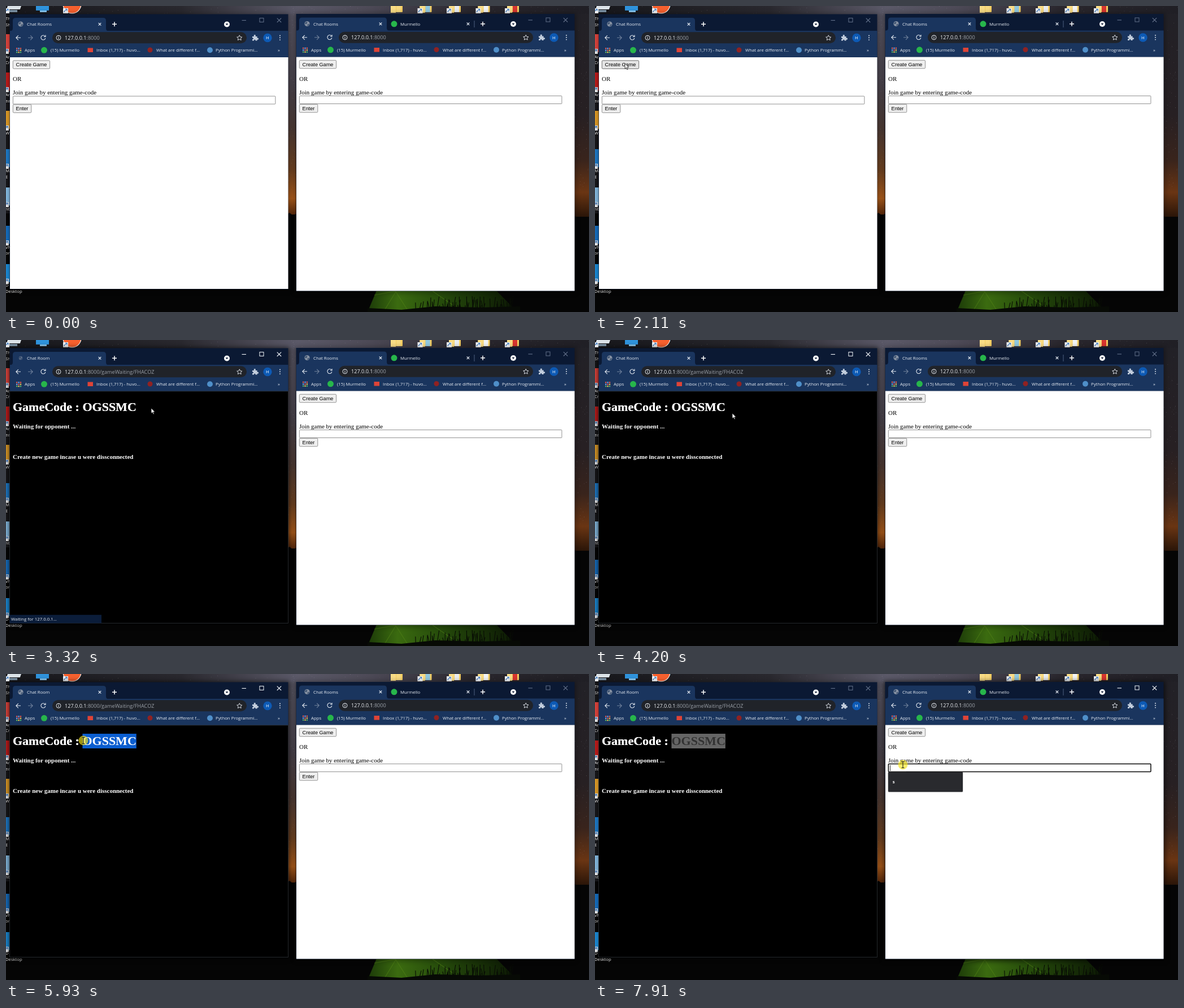
An HTML page that plays this animation: 1032 px wide and 543 px high, repeating every 8 s.

```html
<!DOCTYPE html>
<html lang="en">
<head>
<meta charset="utf-8">
<title>Chat Rooms</title>
<style>
html, body { margin: 0; width: 100%; height: 100%; overflow: hidden; background: #050505; }
svg { display: block; width: 100%; height: 100%; }
text { white-space: pre; }
.ui { font-family: "Open Sans", "Noto Sans", sans-serif; }
.page { font-family: "Liberation Serif", serif; }
.form { font-family: "Liberation Sans", sans-serif; }
.bold { font-weight: 700; }
.line { fill: none; stroke-width: 1.1; }
</style>
</head>
<body>
<svg id="stage" viewBox="0 0 1032 543"></svg>
<script>
const LOOP = 8000;
const stage = document.getElementById('stage');

const text = (x, y, s, size, fill, cls = 'ui', attrs = '') =>
  `<text x="${x}" y="${y}" font-size="${size}" fill="${fill}" class="${cls}" ${attrs}>${s}</text>`;
const rect = (x, y, w, h, fill, attrs = '') =>
  `<rect x="${x}" y="${y}" width="${w}" height="${h}" fill="${fill}" ${attrs}/>`;
const circle = (x, y, r, fill, attrs = '') =>
  `<circle cx="${x}" cy="${y}" r="${r}" fill="${fill}" ${attrs}/>`;
const line = (d, color, attrs = '') => `<path d="${d}" class="line" stroke="${color}" ${attrs}/>`;
const cross = (x, y, r, color, attrs) =>
  line(`M${x - r} ${y - r}l${2 * r} ${2 * r}M${x + r} ${y - r}l${-2 * r} ${2 * r}`, color, attrs);
const group = (id, body, attrs = '') => `<g id="${id}" ${attrs}>${body}</g>`;
const gradient = (id, stops, dir) =>
  `<linearGradient id="${id}" ${dir}>${stops.map(([at, c]) =>
    `<stop offset="${at}" stop-color="${c}"/>`).join('')}</linearGradient>`;

function random(seed) {
  return () => (seed = (seed * 16807) % 2147483647) / 2147483647;
}

// ---- desktop ----
const shortcut = (x, y) => rect(x, y, 9, 9, '#f4f6f8') +
  line(`M${x + 2} ${y + 7}q0-3 4-4m-2-1.500h3v3`, '#1d63b5');

const folder = (x, page) => rect(x, -6, 21, 17, '#f3cd62', 'rx="1"') +
  rect(x + 10, -6, 8, 17, page) + rect(x, 0, 9, 12, '#f9dc86');

function desktop() {
  const vertical = 'x1="0" y1="0" x2="0" y2="1"';
  const rnd = random(71);
  let out = `<defs>
    ${gradient('sky', [[0, '#17171b'], [.3, '#29282e'], [.5, '#5b5968'], [.62, '#4d4a57'], [.8, '#29262d'], [1, '#201f25']], '')}
    ${gradient('glowMid', [[0, '#555360'], [.35, '#48424b'], [.58, '#4d3a34'], [.78, '#6e4221'], [.92, '#a85a1b'], [1, '#5a2a0c']], vertical)}
    ${gradient('glowEnd', [[0, '#222127'], [.5, '#272023'], [.72, '#39241c'], [.88, '#6a3513'], [1, '#2a1508']], vertical)}
    ${gradient('tent', [[0, '#1c3a08'], [.2, '#3b6b10'], [.5, '#254a0b'], [1, '#0b1604']], '')}
    <filter id="soft" x="-10%" y="-10%" width="120%" height="120%"><feGaussianBlur stdDeviation="4"/></filter>
  </defs>`;
  out += rect(0, 0, 1032, 543, '#050505') + rect(0, 0, 1032, 368, 'url(#sky)') +
    rect(0, 14, 8, 354, '#17171a') +
    rect(496, 14, 22, 356, 'url(#glowMid)') + rect(1004, 14, 28, 360, 'url(#glowEnd)');
  for (let i = 0; i < 190; i++) {
    const strip = i % 3;
    const x = strip === 0 ? rnd() * 1032 : strip === 1 ? 500 + rnd() * 14 : 1007 + rnd() * 25;
    const y = strip === 0 ? rnd() * 14 : rnd() * 330;
    out += circle(x.toFixed(1), y.toFixed(1), .4, '#c8c0c8', `opacity="${(.2 + rnd() * .4).toFixed(2)}"`);
  }
  out += '<path d="M496 370l6-3 5 4 7-2v10h-18zM1006 373l8 3 9 0 9 2v10h-26z" fill="#050505"/>';
  out += '<path d="M656 505L640 543H905L868 505z" fill="url(#tent)"/>' +
    line('M652 513L690 506M668 543L690 507 713 543M755 506L790 530', '#568519', 'opacity=".55"');
  let grass = '';
  for (let i = 0; i < 60; i++) {
    const x = 725 + rnd() * 170;
    grass += `M${x.toFixed(1)} 543l${(rnd() * 10 - 5).toFixed(1)} ${(-8 - rnd() * 22).toFixed(1)}`;
  }
  out += line(grass, '#070b04') + '<path d="M640 543V536l60 3 60-6 80 2 70-2v10z" fill="#070a05"/>';

  out += rect(3, 0, 24, 6, '#dce3e8', 'transform="skewX(-20)"') + rect(5, 7, 15, 4, '#7e95a8') +
    shortcut(-3, 4) + rect(53, -4, 23, 12, '#2f93dc') + rect(60, 8, 12, 3, '#88c6ee') +
    circle(117, -3, 16.500, '#fff') + circle(117, -3, 15.500, '#f6602e') + shortcut(101, 4);
  ['#f7d980', '#8fc7df', '#e9edf0', '#f2f4f6', '#d8352f'].forEach((page, i) => {
    const x = 681 + i * 51.500;
    out += folder(x, page) + (i ? shortcut(x - 4, 4) : '');
  });
  ['#e8473f', '#c51c1c', '#e8a329', '#1f7fd0', '#8cc4ec', '#1673c8', '#1c91e0'].forEach((color, i) => {
    const y = 50 + i * 68;
    out += rect(-6, y, 13, 32, color) + shortcut(-4, y + 26);
  });
  [['Thi', 25], ['Sh', 36], ['Ar', 93], ['Cr', 103], ['Ar', 160], ['ea', 171], ['W', 228],
   ['Ma', 295], ['E', 306], ['ntu', 363], ['VN', 431], ['or', 441], ['D', 498], ['Desktop', 509]]
    .forEach(([s, y]) => out += text(-1, y, s, 7.7, '#fff'));
  return out;
}

// ---- browser windows ----
const WHITE = '#e8edf4', NAVY = '#0b1933', BAR = '#1a355e';

const globe = () => circle(26, 32, 4.6, '#8792a3') +
  '<path d="M22.500 30q3-3 4 0l-1 2-3 1zM26 34l3-2 1 2-3 2z" fill="#405573"/>';

function bookmarks() {
  const colors = ['#ea5b50', '#53b36a', '#6ba2ee', '#efc34b'];
  let out = '';
  for (let i = 0; i < 9; i++)
    out += rect(18 + (i % 3) * 3.4, 74.200 + Math.floor(i / 3) * 3.4, 2.300, 2.300, colors[(i * 2 + (i > 4)) % 4]);
  out += circle(67.500, 78.300, 5.500, '#27b64b') + rect(144.500, 74.500, 9.500, 7.500, '#df4437') +
    circle(255, 78, 4.5, '#8f2222') + circle(361, 78.200, 5, '#4f8fc9');
  [[33, 'Apps'], [79, '(15) Murmello'], [160, 'Inbox (1,717) - huvo...'],
   [266, 'What are different f...'], [371, 'Python Programmi...'], [481, '»']]
    .forEach(([x, s]) => out += text(x, 81, s, 7.8, WHITE));
  return out;
}

function controls(id) {
  return group(id, line('M417.500 25.500h7.500', 'currentColor') +
    rect(449, 21.500, 7, 7, 'none', 'stroke="currentColor"') + cross(483.500, 25.300, 3.700, 'currentColor'));
}

function browser(side, height, tabEnd, plusX, extraTab) {
  const e = tabEnd;
  return rect(4, 13, 498, height + 5, '#000', `id="${side}Shadow" filter="url(#soft)"`) +
    rect(6.500, 14.500, 493, height, NAVY) +
    `<path d="M7 44.500q5 0 5-5V26q0-5 5-5H${e - 5}q5 0 5 5V39.500q0 5 5 5z" fill="${BAR}"/>` +
    rect(7, 44, 492.500, 47, BAR) +
    group(side + 'Icon', globe()) +
    text(37, 35.200, 'Chat Rooms', 7.8, WHITE, 'ui', `id="${side}Title"`) +
    cross(e - 11, 32.300, 2.300, WHITE) + extraTab +
    line(`M${plusX - 4} 32.300h8m-4-4v8`, '#fff', 'style="stroke-width:1.5"') +
    circle(391, 32.500, 5, '#fff') + `<path d="M388.600 31.300h4.800l-2.400 3z" fill="${NAVY}"/>` +
    controls(side + 'Controls') +
    line('M26 56.300h-8m3.800-4l-4 4 4 4', WHITE) + line('M39 56.300h8m-3.800-4l4 4-4 4', '#71829c') +
    group(side + 'Reload', line('M69 53.500a4 4 0 1 0 .8 3.500M70 51.500v3h-3', WHITE)) +
    rect(82, 46.300, 344, 20, '#202329', 'rx="10"') +
    circle(93, 56.300, 4, 'none', `stroke="${WHITE}"`) + line('M93 55.600v2.800M93 53.600v1', WHITE) +
    `<text x="104" y="59.600" font-size="9.1" fill="#edf0f4" class="ui">127.0.0.1<tspan fill="#9aa0a8" id="${side}Path">:8000</tspan></text>` +
    line('M413.300 51.800l1.400 3 3.200.4-2.400 2.200.7 3.200-2.900-1.600-2.900 1.600.7-3.200-2.400-2.200 3.200-.4z', WHITE, 'style="stroke-width:.9"') +
    '<path d="M436 54h3q-1-3 1.300-3t1.300 3h3v3q2.500-.8 2.500 1.200t-2.500 1.200V61.500h-3q0-2-1.300-2t-1.300 2h-3v-2.500q2 0 2-1.200t-2-1.200z" fill="#c3cedd"/>' +
    circle(463, 56.500, 7.700, '#0d5ab5') + text(463, 59.300, 'H', 7.8, '#fff', 'ui', 'text-anchor="middle"') +
    [52.500, 56.300, 60.100].map(y => circle(485, y, .95, WHITE)).join('') +
    bookmarks();
}

const button = (id, y, w, s) =>
  rect(12.300, y, w, 14.500, '#efefef', `id="${id}" rx="1.500" stroke="#767676" stroke-width=".8"`) +
  text(17.600, y + 10.300, s, 9.14, '#000', 'form');

const lobby = (side, height) => rect(7, 91, 492.500, height, '#fff') +
  button(side + 'Create', 96.800, 65.300, 'Create Game') +
  text(12, 133, 'OR', 10.97, '#000', 'page') +
  text(12, 157, 'Join game by entering game-code', 10.97, '#000', 'page') +
  rect(12.400, 160, 464.500, 14, '#fff', `id="${side}Input" rx="1" stroke="#767676" stroke-width=".8"`) +
  button(side + 'Enter', 174.800, 32.500, 'Enter');

const CODE = 'OGSSMC', HEAD = 'GameCode : ';
const heading = code => text(12, 126.300, HEAD + code, 22, '#fff', 'page bold');

function waiting() {
  return rect(7, 91, 492.500, 411, '#000') + rect(6.500, 91, 493, 411.500, 'none', 'stroke="#2c2e31" stroke-width=".8"') +
    heading(`<tspan id="code">${CODE}</tspan>`) +
    rect(0, 106, 0, 26, '#0b5ed0', 'id="selection"') +
    heading(`<tspan id="codeTop">${CODE}</tspan>`) +
    text(12, 157, 'Waiting for opponent ...', 10.97, '#fff', 'page bold') +
    text(12, 211, 'Create new game incase u were dissconnected', 10.97, '#fff', 'page bold') +
    group('status', rect(6.500, 487.700, 162.500, 14.800, '#0b1d3a') +
      text(9, 497.800, 'Waiting for 127.0.0.1...', 7.8, WHITE));
}

const secondTab = circle(180, 32.300, 5.500, '#27b64b') + text(191, 35.200, 'Murmello', 7.8, WHITE) +
  cross(311, 32.300, 2.300, WHITE) + line('M322 26.500v12', '#4a5c7b');

stage.innerHTML = desktop() +
  group('left', browser('left', 488, 177, 192, '') +
    group('leftSpinner', line('M20 32a4.700 4.700 0 0 1 4.700-4.700', '#d5deea')) +
    group('leftStop', cross(66, 56.300, 3.700, WHITE)) +
    group('leftLobby', lobby('left', 411)) + group('waiting', waiting())) +
  group('right', browser('right', 492, 167, 337, secondTab) + lobby('right', 415) +
    group('suggest',
      rect(11.500, 174.500, 133, 36, '#000', 'opacity=".3" rx="2"') +
      rect(12, 174.300, 132, 35.200, '#292a2e', 'rx="1.500"') +
      text(19.800, 194.300, 's', 7.8, '#fff', 'ui bold') +
      line('M15.500 162v10.500', '#000', 'style="stroke-width:.8"')),
    'transform="translate(507 -.5)"') +
  group('pointer',
    circle(0, 0, 8.500, '#f5e31c', 'id="press" opacity=".65"') +
    group('arrow', '<path d="M0 0V9.400L2.200 7.400 3.700 10.900 5.200 10.200 3.700 6.900H6.700Z" fill="#fff" stroke="#111" stroke-width=".75"/>') +
    group('beam', line('M-2.500-5.500h2l.5.500.5-.5h2M0-5V5M-2.500 5.500h2l.5-.5.5.5h2', '#222')));

const el = id => document.getElementById(id);
const show = (id, on) => { el(id).style.display = on ? '' : 'none'; };
const set = (id, attrs) => { for (const k in attrs) el(id).setAttribute(k, attrs[k]); };

// ---- timeline: time, x, y ----
const TRACK = [
  [400, 984, 540], [560, 870, 400], [740, 730, 260], [850, 692, 228], [950, 665, 264],
  [1190, 665, 264], [1300, 610, 262], [1500, 400, 208], [1700, 180, 146], [1860, 82, 114], [1980, 55, 105],
  [2020, 55, 105], [2110, 53, 102], [2260, 53, 102], [2310, 52, 102],
  [2800, 52, 102], [3000, 110, 140], [3150, 188, 154], [3260, 232, 142], [3320, 257, 121], [3440, 262, 114], [3580, 250, 116],
  [3630, 250, 116], [3900, 238, 126], [4200, 243, 130], [4420, 249, 122], [4640, 248, 121],
  [5110, 248, 121], [5150, 212, 118], [5190, 172, 115], [5300, 152, 116], [5600, 141, 118], [5850, 138, 118],
  [5930, 137, 118], [6050, 137, 115], [6720, 137, 115], [6860, 285, 150], [7060, 529, 193], [7180, 566, 190],
  [7350, 556, 172], [7520, 545, 162], [7630, 545, 162], [7850, 545, 161], [LOOP, 545, 161]
];
// time, number of selected letters counted from the end
const SELECT = [[0, 0], [5150, 1], [5190, 2], [5240, 4], [5330, 5], [5560, 6]];

function pointerAt(t) {
  const i = TRACK.findIndex(k => k[0] > t);
  const [t0, x0, y0] = TRACK[i - 1], [t1, x1, y1] = TRACK[i];
  const p = (t - t0) / (t1 - t0);
  return [x0 + (x1 - x0) * p, y0 + (y1 - y0) * p];
}

const within = (t, a, b) => t >= a && t < b;

function focusWindow(side, on) {
  el(side + 'Controls').style.color = on ? '#f4f7fb' : '#63718a';
  set(side + 'Shadow', { opacity: on ? .6 : .3 });
}

function draw(t) {
  const loading = within(t, 2800, 3320), joined = t >= 3320, blurred = t >= 7850;
  focusWindow('left', within(t, 2540, 7850));
  focusWindow('right', blurred);

  show('leftLobby', !joined);
  show('waiting', joined);
  show('leftSpinner', loading);
  show('leftIcon', !loading);
  show('leftReload', !loading);
  show('leftStop', loading);
  set('leftSpinner', { transform: `rotate(${-(t - 3260) * .36} 24.700 32)` });
  const young = within(t, 3320, 3520);
  set('leftIcon', { opacity: young ? .55 : 1, transform: young ? 'translate(7.800 9.600) scale(.7)' : '' });
  el('leftTitle').textContent = joined ? 'Chat Room' : 'Chat Rooms';
  el('leftPath').textContent = joined ? ':8000/gameWaiting/FHACOZ' : ':8000';
  set('status', { opacity: Math.max(0, Math.min(1, (3950 - t) / 200)) });

  const hover = within(t, 1940, 2850), down = within(t, 2540, 2800);
  set('leftCreate', { fill: down ? '#f5f5f5' : hover ? '#e5e5e5' : '#efefef', stroke: hover && !down ? '#4f4f4f' : '#767676' });

  const count = SELECT.filter(s => s[0] <= t).pop()[1];
  show('selection', count);
  if (count) {
    const from = el('code').parentNode.getStartPositionOfChar(HEAD.length + CODE.length - count).x;
    const to = 12 + el('code').parentNode.getComputedTextLength();
    set('selection', { x: from, width: to - from, fill: blurred ? '#656565' : '#0b5ed0' });
  }
  el('codeTop').style.fill = blurred ? '#323232' : '#fff';

  set('rightInput', { stroke: blurred ? '#050505' : '#767676', 'stroke-width': blurred ? 1.5 : .8 });
  show('suggest', t >= 7910);

  show('pointer', t >= 400);
  if (t >= 400) {
    const [x, y] = pointerAt(t);
    set('pointer', { transform: `translate(${x.toFixed(2)} ${y.toFixed(2)})` });
    const beam = within(t, 5130, 6050) || t >= 7480;
    show('beam', beam);
    show('arrow', !beam);
    show('press', down || within(t, 4900, 5990) || blurred);
  }
}

const start = performance.now();
function tick() {
  draw((performance.now() - start) % LOOP);
  requestAnimationFrame(tick);
}
tick();
</script>
</body>
</html>
```
